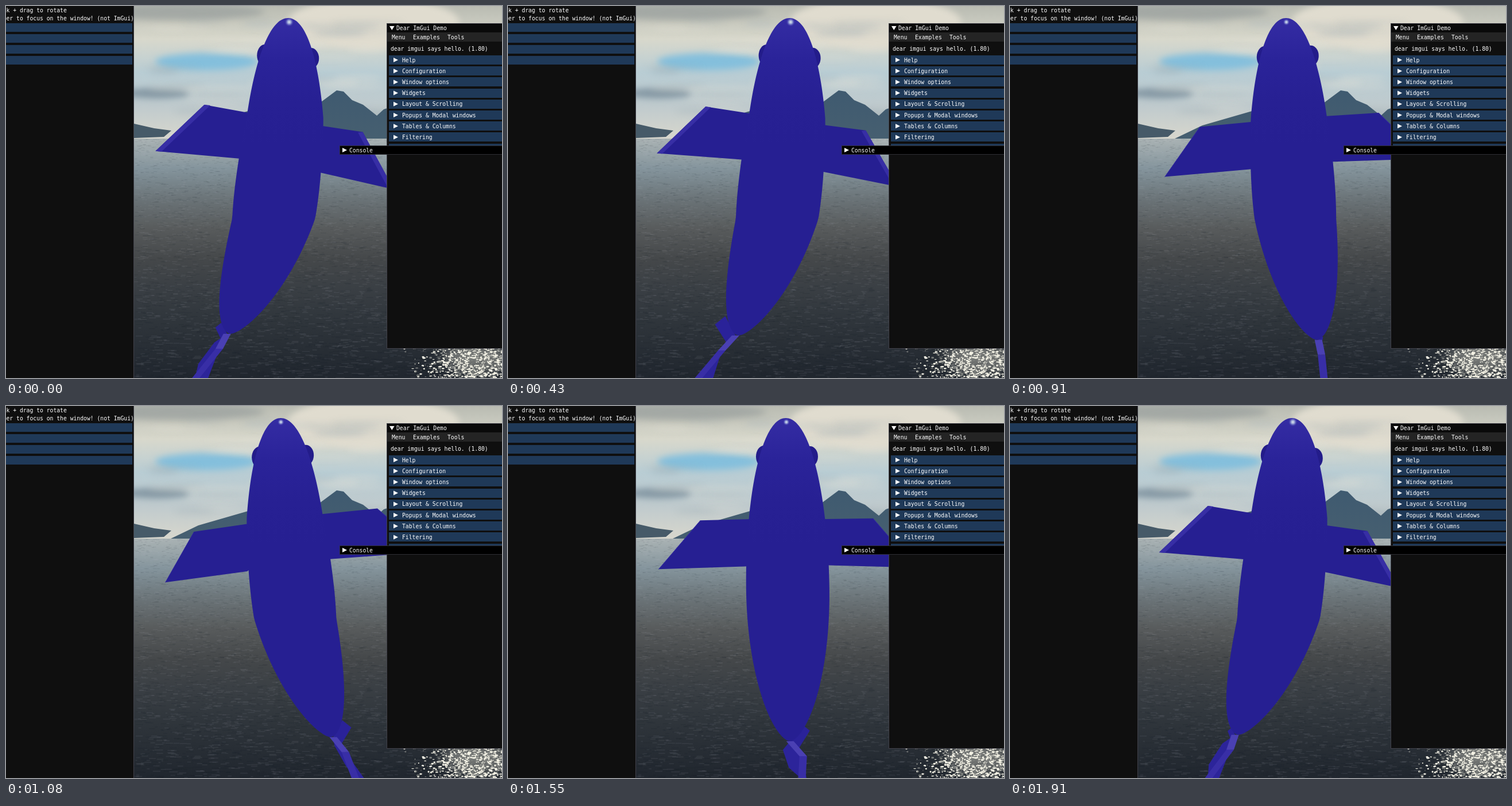
An HTML page with a canvas for the animation above (1970 ms loop, 864 by 648 pixels).

```html
<!DOCTYPE html>
<html>
<head>
<meta charset="utf-8">
<style>
html, body { margin: 0; width: 864px; height: 648px; overflow: hidden; background: #0f0f0f; }
canvas, svg { position: absolute; left: 0; top: 0; }
text { font: 9.72px "DejaVu Sans Mono", monospace; fill: #fff; white-space: pre; }
</style>
</head>
<body>
<canvas id="lake" width="864" height="648"></canvas>
<canvas id="fish" width="864" height="648"></canvas>
<svg id="ui" width="864" height="648"></svg>
<script>
const LOOP = 1970;
const lake = document.getElementById('lake').getContext('2d');
const g = document.getElementById('fish').getContext('2d');

function polygon(c, points, fill) {
  c.beginPath();
  points.forEach(p => c.lineTo(p[0], p[1]));
  c.closePath();
  c.fillStyle = fill;
  c.fill();
}

function ellipse(c, x, y, rx, ry, fill) {
  c.beginPath();
  c.ellipse(x, y, rx, ry, 0, 0, 7);
  c.fillStyle = fill;
  c.fill();
}

// Vertical gradient with evenly spaced colours
function vertical(c, y0, y1, ...colors) {
  const grad = c.createLinearGradient(0, y0, 0, y1);
  colors.forEach((color, i) => grad.addColorStop(i / (colors.length - 1), color));
  return grad;
}

let seed = 7;
function random() {
  seed = (seed * 16807) % 2147483647;
  return seed / 2147483647;
}

// ---- Scenery ----
function drawSky(c) {
  c.fillStyle = vertical(c, 0, 232, '#b9bbb2', '#d8d8cc', '#b9cdd4', '#bfcacd', '#d8d7cd');
  c.fillRect(0, 0, 864, 232);
  c.filter = 'blur(6px)';
  ellipse(c, 300, 10, 150, 14, '#a3a8a4');
  ellipse(c, 350, 97, 90, 15, '#84bfdc');
  ellipse(c, 262, 152, 58, 9, '#8497a3');
  ellipse(c, 640, 30, 150, 45, '#e0dccf');
  for (let i = 0; i < 45; i++) {
    const tone = random() < .6 ? 'rgba(232,230,218,.35)' : 'rgba(135,155,168,.25)';
    ellipse(c, 223 + random() * 440, 25 + random() * 180, 25 + random() * 45, 2 + random() * 4, tone);
  }
  c.filter = 'none';
}

function drawHills(c) {
  polygon(c, [[285, 232], [335, 208], [425, 182], [545, 170], [576, 147], [588, 149], [603, 164],
    [622, 172], [646, 191], [658, 180], [670, 176], [670, 232]], vertical(c, 147, 232, '#3f5a70', '#465f70'));
  polygon(c, [[223, 205], [258, 213], [288, 217], [275, 228], [223, 230]], '#465a68');
}

function drawWater(c) {
  c.fillStyle = vertical(c, 231, 648, '#aab3b4', '#84949c', '#6b7478', '#585b5c', '#45484a',
    '#3a3f44', '#30363c', '#282e35', '#20262e');
  c.fillRect(0, 231, 864, 417);
  for (let i = 0; i < 7000; i++) {
    const depth = random() ** 1.4;
    c.fillStyle = random() < .5 ? 'rgba(205,215,218,.07)' : 'rgba(10,20,30,.10)';
    c.fillRect(223 + random() * 641, 232 + depth * 416, 3 + random() * (3 + depth * 10), .8 + depth);
  }
}

function drawGlitter(c) {
  c.filter = 'blur(12px)';
  ellipse(c, 820, 612, 55, 24, 'rgba(200,198,185,.5)');
  c.filter = 'none';
  for (let i = 0; i < 1100; i++) {
    const x = 820 + (random() + random() + random() - 1.5) * 90;
    ellipse(c, x, 596 + random() * 52, .6 + random() * 2.4, .5 + random() * 1.1, random() < .6 ? '#f5f3e6' : '#777a78');
  }
}

// ---- Fish ----
// Time and phase of the swimming stroke; phase 0 bends the tail furthest left
const stroke = [[0, -.29], [430, .59], [710, 1.71], [910, 2.22], [1270, 3.5], [1550, 4.56], [1910, 5.78],
  [LOOP, 2 * Math.PI - .29]];

function phaseAt(t) {
  const i = stroke.findIndex(key => key[0] > t);
  const [t0, p0] = stroke[i - 1], [t1, p1] = stroke[i];
  return p0 + (p1 - p0) * (t - t0) / (t1 - t0);
}

const NOSE = 21, SHOULDER = 195, HIP = 370;

// Sideways shift of the spine at height y for a full bend
function sway(y) {
  if (y < SHOULDER) return 7 * (SHOULDER - y) / (SHOULDER - NOSE);
  const u = Math.max(0, y - HIP);
  return -.118 * (y - SHOULDER) - .17 * u - .0004 * u * u;
}

function girth(s) {
  const v = (s - .53) / (s < .53 ? .53 : .47);
  return 72.5 * Math.max(0, 1 - v * v) ** (s < .53 ? .48 : .6);
}

function spine(s, bend, rear) {
  const y = NOSE + (rear - NOSE) * s;
  return [484 + 6 * s + sway(y) * bend, y];
}

function drawTail([x, y], bend, phase) {
  const knee = 4 - 28 * Math.cos(phase - .6);
  const tip = -8 - 60 * Math.cos(phase - .35);
  const leaf = 12 * Math.sin(phase) - 12;
  const lift = Math.abs(knee) / 30, w = 6.5, end = 650;
  const start = [x - 6 * bend, y], ax = start[0];
  const bx = ax + knee, by = y + 26, cx = ax + tip;

  polygon(g, [start, [ax + knee * .75, y - 42 * lift], [ax + knee * 1.5, y - 24 * lift],
    [ax + knee * .6, y + 15]], '#2a2299');
  polygon(g, [start, [(ax + bx) / 2 + leaf, y + 15], [(bx + cx) / 2 + leaf, (by + end) / 2],
    [cx, end], [cx + Math.abs(tip) * .4, end], [bx, by]], '#2c249a');
  polygon(g, [[bx - w, by], [bx + w, by], [cx + w, end], [cx - w, end]], '#382ea6');
  polygon(g, [[ax - w, y], [ax + w, y], [bx + w, by], [bx - w, by]], '#4a40b3');
}

function drawFin(root, corner, tip, base, edge) {
  polygon(g, [root, corner, tip, base, [487, 240]], '#261f92');
  const inner = ([x, y]) => [x + edge, y + 1];
  polygon(g, [corner, tip, inner(tip), inner(corner)], '#372ea5');
}

function drawFish(t) {
  const phase = phaseAt(t);
  const b = .13 + .95 * Math.cos(phase);
  const rear = 584 - 12 * b * b, edge = 10 * Math.max(0, b);
  g.clearRect(0, 0, 864, 648);

  drawTail(spine(1, b, rear), b, phase);
  drawFin([425, 197 - 10 * b], [335 + 10 * b, 199 - 26 * b], [262 - 12 * b + 10 * b * b, 284 - 30 * b],
    [420, 279 - 11.5 * b], edge);
  drawFin([548, 197 + 11 * b], [636 - 14 * b, 196 + 22.5 * b], [710 - 33 * b, 282 + 36 * b],
    [540, 277 + 11 * b], -edge * .8);
  ellipse(g, 446 + 5 * b, 88 - 2 * b, 14, 19, '#231c8a');
  ellipse(g, 526 + 5 * b, 88 + 3 * b, 14, 18, '#231c8a');

  const left = [], right = [];
  for (let i = 0; i <= 100; i++) {
    const s = (1 - Math.cos(Math.PI * i / 100)) / 2;
    const [x, y] = spine(s, b, rear);
    const half = girth(s) * (1 + .1 * b * b * s ** 3);
    left.push([x - half, y]);
    right.unshift([x + half, y]);
  }
  polygon(g, [...left, ...right], vertical(g, NOSE, 240, '#342ca3', '#2a2399', '#272093', '#261f92'));

  const gx = 485 + 8 * b, r = 6 + 2 * Math.max(0, b);
  const gleam = g.createRadialGradient(gx, 28, 0, gx, 28, r);
  gleam.addColorStop(0, '#e4efef');
  gleam.addColorStop(.4, 'rgba(165,180,222,.85)');
  gleam.addColorStop(1, 'rgba(60,52,175,0)');
  ellipse(g, gx, 28, r, r, gleam);
}

// ---- Interface ----
const rect = (x, y, w, h, fill, stroke = 'none') =>
  `<rect x="${x}" y="${y}" width="${w}" height="${h}" fill="${fill}" stroke="${stroke}"/>`;
const label = (x, y, s) => `<text x="${x}" y="${y + 3.5}">${s}</text>`;
const arrow = (x, y) => `<path d="M${x} ${y - 4}l8 4l-8 4z" fill="#fff"/>`;
const header = '#1f3958', border = '#41414a';

function buildInterface() {
  const items = ['Help', 'Configuration', 'Window options', 'Widgets', 'Layout &amp; Scrolling',
    'Popups &amp; Modal windows', 'Tables &amp; Columns', 'Filtering'];
  const rowY = i => 94 + i * 19.2;
  let out = rect(0, 0, 223, 648, '#0f0f0f') + rect(222, 0, 1, 648, border);
  out += label(.5, 7, 'k + drag to rotate') + label(.5, 21, 'er to focus on the window! (not ImGui)');
  for (let i = 0; i < 4; i++) out += rect(0, 30 + i * 19, 220, 15, header);

  out += rect(663.5, 30.5, 210, 566, '#0f0f0f', border);
  out += rect(664, 31, 200, 15, '#0a0a0a') + rect(664, 46, 200, 16, '#242424');
  out += '<path d="M668 35h8.5l-4.25 7z" fill="#fff"/>' + label(680, 38, 'Dear ImGui Demo');
  out += label(672, 54.5, 'Menu') + label(709, 54.5, 'Examples') + label(769, 54.5, 'Tools');
  out += label(670, 74.5, 'dear imgui says hello. (1.80)');
  for (let i = 0; i < 9; i++) out += rect(667, Math.round(rowY(i) - 8), 197, 16, header);
  items.forEach((name, i) => out += arrow(675, rowY(i)) + label(690, rowY(i), name));

  out += rect(581.5, 243.5, 290, 15, '#000', '#2e2e34') + arrow(586, 251) + label(598, 251, 'Console');
  document.getElementById('ui').innerHTML = out;
}

[drawSky, drawHills, drawWater, drawGlitter].forEach(draw => draw(lake));
buildInterface();

const begin = performance.now();
function tick() {
  drawFish((performance.now() - begin) % LOOP);
  requestAnimationFrame(tick);
}
tick();
</script>
</body>
</html>
```
